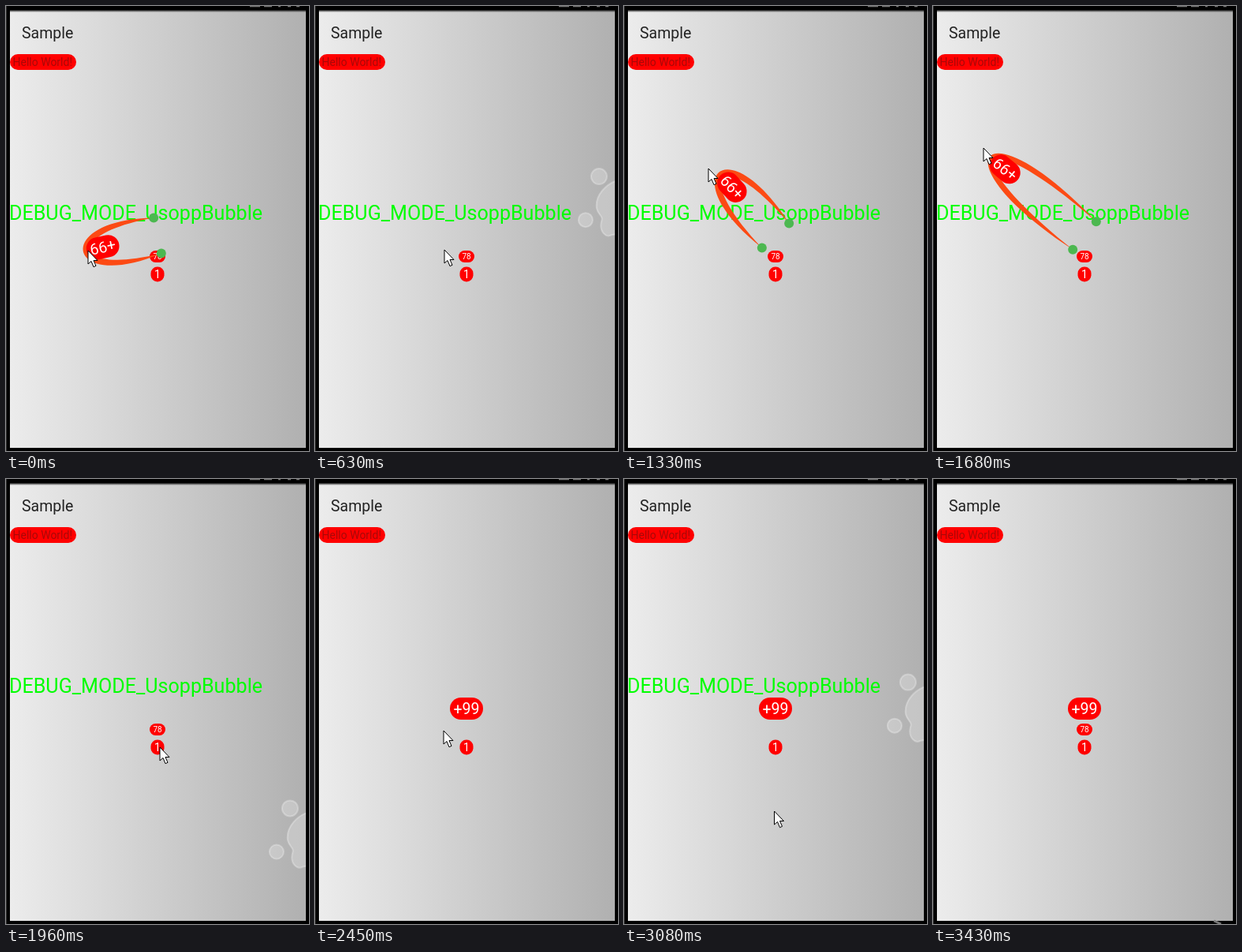
These frames come from a looping animation (384x564 px, 3710 ms). An HTML page:

```html
<!DOCTYPE html>
<html lang="en">
<head>
<meta charset="utf-8">
<title>Elastic bubbles</title>
<style>
  html, body { margin: 0; width: 100%; height: 100%; overflow: hidden; background: #000; }
  svg { display: block; width: 384px; height: 564px; font-family: Roboto, "Noto Sans", sans-serif; }
  .badge rect { fill: #f00; }
  .badge text { fill: #fff; text-anchor: middle; }
</style>
</head>
<body>
<svg viewBox="0 0 384 564">
  <defs>
    <linearGradient id="shade">
      <stop offset="0" stop-color="#ececec"/>
      <stop offset="1" stop-color="#b0b0b0"/>
    </linearGradient>
    <linearGradient id="bar" x2="0" y2="1">
      <stop offset="0" stop-color="#000"/>
      <stop offset=".6" stop-color="#000"/>
      <stop offset="1" stop-color="#000" stop-opacity="0"/>
    </linearGradient>
    <clipPath id="screen"><rect x="5" y="5" width="375" height="555"/></clipPath>
  </defs>
  <rect width="384" height="564"/>
  <path d="M.5 0V564" stroke="#333"/>
  <rect x="5" y="5" width="375" height="555" fill="url(#shade)"/>
  <rect x="5" width="375" height="8" fill="url(#bar)"/>
  <path d="M309 .5h13M327 .5h10M345 .5h3M357 .5h4M368 .5h4" stroke="#777" stroke-width="1.5"/>
  <text x="20" y="41" font-size="19.5" fill="#222">Sample</text>
  <rect x="5" y="61" width="84" height="20" rx="10" fill="#f00"/>
  <text x="8.5" y="76" font-size="14" fill="#a80808">Hello World!</text>

  <g clip-path="url(#screen)">
    <g class="badge" transform="translate(192 340)">
      <rect x="-8.5" y="-9.5" width="17" height="19" rx="8.3"/>
      <text y="5" font-size="14">1</text>
    </g>
    <g id="rest"></g>
    <text id="label" x="4" y="271" font-size="25.1" fill="#0f0">DEBUG_MODE_UsoppBubble</text>
    <path id="band" fill="#fc4a14"/>
    <g id="held"></g>
    <g id="anchors" fill="#4cb850"><circle/><circle/></g>
    <g id="burst" fill="#fff" fill-opacity=".25" stroke="#fff" stroke-opacity=".28" stroke-width="2">
      <circle cx="-24" cy="-34" r="10"/>
      <circle cx="-41" cy="21" r="9"/>
      <path d="M2-30C-16-25-29-10-27 6C-25 15-18 16-21 23C-24 36-15 44-8 40L2 38Z"/>
    </g>
  </g>
  <path id="stub" d="M356 560L365 564" stroke="#777" stroke-width="3"/>
  <path id="cursor" d="M0 0V17L4 13.5L7 20.7L10 19.3L7 12.5H12Z" fill="#fff" stroke="#000"/>
</svg>
<script>
const LOOP = 3710, STEP = 70, EDGE = 384;
const el = id => document.getElementById(id);
const show = (node, on) => { node.style.display = on ? '' : 'none'; };

const big = { x: 192, y: 291, w: 42, h: 28, size: 19.5, text: '+99', dot: 6 };
const small = { x: 192, y: 317.5, w: 20, h: 15, size: 10, text: '78', dot: 2.3 };

// Each shot: grab, release, burst, end, and the keyed tip of the rubber band.
const shots = [
  { b: big, grab: -STEP, release: 350, burst: 560, end: 910, tip: [[0, 98, 311]] },
  { b: big, grab: 980, release: 1680, burst: 1890, end: 2240,
    tip: [[1050, 168, 270], [1330, 120, 211], [1680, 72, 190.7]] },
  { b: small, grab: 2450, release: 2800, burst: 3010, end: 3360,
    tip: [[2520, 149, 321], [2730, 89, 331], [2800, 88, 331.5]] }
];
const pointer = [
  [0, 104, 310], [280, 104, 310], [630, 164, 309], [770, 186, 288], [980, 184, 286],
  [1330, 107, 206], [1680, 64, 180], [1960, 195, 340], [2310, 192, 319], [2380, 192, 319],
  [2450, 163, 319], [2730, 91, 332], [2870, 90, 334], [3430, 358, 566]
];

function at(keys, t) {
  const i = keys.findIndex(k => k[0] > t);
  if (i === 0) return keys[0].slice(1);
  if (i < 0) return keys[keys.length - 1].slice(1);
  const [a, b] = [keys[i - 1], keys[i]];
  const p = (t - a[0]) / (b[0] - a[0]);
  return [a[1] + (b[1] - a[1]) * p, a[2] + (b[2] - a[2]) * p];
}

function addBadge(parent, b) {
  parent.insertAdjacentHTML('beforeend', `<g class="badge" transform="translate(${b.x} ${b.y})">
    <rect x="${-b.w / 2}" y="${-b.h / 2}" width="${b.w}" height="${b.h}" rx="${b.h / 2}"/>
    <text y="${b.size * 0.355}" font-size="${b.size}">${b.text}</text></g>`);
  return parent.lastElementChild;
}
for (const b of [big, small]) {
  b.rest = addBadge(el('rest'), b);
  b.held = addBadge(el('held'), b);
}

function bandPath(point, b, reach) {
  const r = b.w * 0.55, k = b.w * 1.15, cx = reach * 4 / 3;
  const dx = Math.min(cx, b.w * 0.28), dk = b.w * 0.5;
  return `M${point(0, r)}C${point(cx, k)} ${point(cx, -k)} ${point(0, -r)}` +
    `C${point(cx - dx, dk - k)} ${point(cx - dx, k - dk)} ${point(0, r)}Z`;
}

function drawShot(shot, t) {
  const b = shot.b;
  const [tx, ty] = at(shot.tip, Math.min(t, shot.release));
  const length = Math.hypot(tx - b.x, ty - b.y);
  const ux = (tx - b.x) / length, uy = (ty - b.y) / length;
  const point = (along, across) => [b.x + ux * along - uy * across, b.y + uy * along + ux * across];
  const inset = b.w * 0.6, start = length - inset, stop = (EDGE - b.x) / ux;
  const flight = Math.max(0, (t - shot.release) / (shot.burst - shot.release));
  const d = start + (stop - start) * flight;
  const flying = t < shot.burst, stretched = flying && d > 0;

  show(b.held, flying);
  b.held.setAttribute('transform', `translate(${point(d, 0)}) rotate(${Math.atan2(uy, ux) * 180 / Math.PI})`);
  show(el('band'), stretched);
  show(el('anchors'), stretched);
  el('band').setAttribute('d', bandPath(point, b, d + inset));
  [...el('anchors').children].forEach((dot, i) => {
    const [x, y] = point(0, b.w * (i ? 0.55 : -0.55));
    dot.setAttribute('cx', x);
    dot.setAttribute('cy', y);
    dot.setAttribute('r', b.dot);
  });
  show(el('burst'), !flying);
  if (!flying) {
    const p = (t - shot.burst) / (shot.end - shot.burst);
    el('burst').setAttribute('transform', `translate(${point(stop, 0)}) scale(${0.99 + p * 0.06})`);
    el('burst').setAttribute('opacity', Math.min(1, 2.2 - 2 * p));
  }
}

function render(time) {
  const t = Math.floor((time % LOOP) / STEP) * STEP;
  const last = t >= 3430;
  const shot = shots.find(s => t >= s.grab && t < s.end);
  const active = shot && t >= shot.grab + STEP;
  for (const b of [big, small]) {
    show(b.rest, !shot || shot.b !== b);
    show(b.held, false);
  }
  for (const id of ['label', 'band', 'anchors', 'burst']) show(el(id), active && id === 'label');
  if (active) drawShot(shot, t);
  show(el('cursor'), !last);
  show(el('stub'), last);
  el('cursor').setAttribute('transform', `translate(${at(pointer, t)})`);
}

const origin = performance.now();
function tick() {
  render(performance.now() - origin);
  requestAnimationFrame(tick);
}
tick();
</script>
</body>
</html>
```
